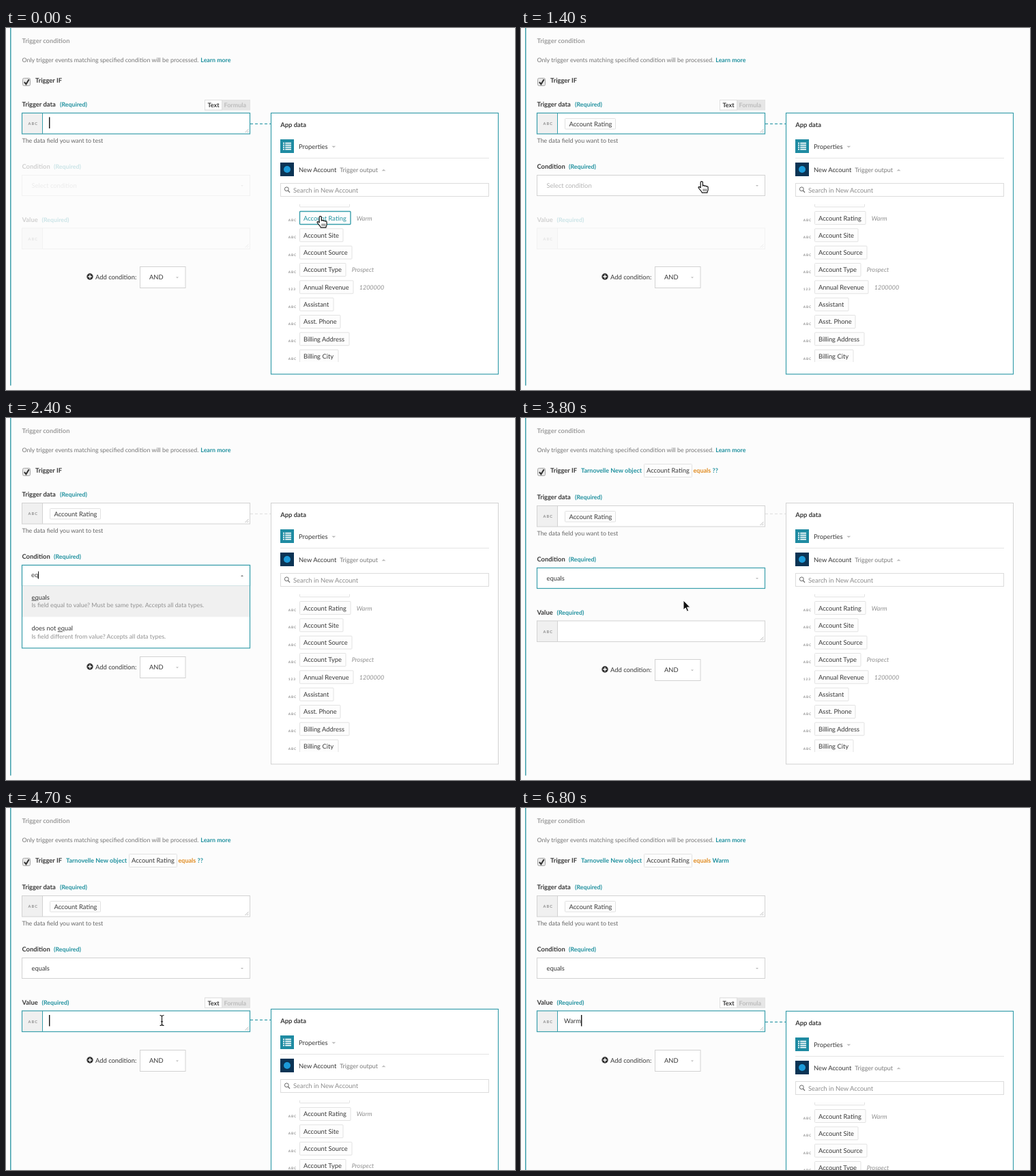
Write an HTML page that moves like this. It is 746 px wide and 530 px high and loops after 7000 ms.

```html
<!DOCTYPE html>
<html lang="en">
<head>
<meta charset="utf-8">
<title>Trigger condition</title>
<style>
html, body { margin: 0; width: 100%; height: 100%; overflow: hidden; background: #fcfcfc; }
svg { display: block; font-family: Lato, sans-serif; text-rendering: geometricPrecision; }
text { white-space: pre; }
</style>
</head>
<body>
<svg id="stage" width="746" height="530" viewBox="0 0 746 530"></svg>
<script>
const LOOP = 7000, STEP = 100;
const TEAL = '#20919f', FOCUSED = '#3a9fac', INK = '#383838', LINE = '#d2d2d2', MUTED = '#9c9c9c';
const BIG = 9.38, SMALL = 8.88;

// Moments of the story, in ms
const PICK = 500, OPEN = 1600, CHOOSE = 3000, FOCUS = 4250, SUMMARY = 5700;
const QUERY = [[2100, 'e'], [2400, 'eq'], [2500, 'equ'], [2600, 'equa'], [2800, 'equal']];
const VALUE = [[5000, 'W'], [5150, 'Wa'], [5300, 'War'], [5400, 'Warm']];

const OPTIONS = [
  ['contains', 'Does field contain value? Only works for text data.'],
  ['starts with', 'Does field start with value? Only works for text data.'],
  ['ends with', 'Does field end with value? Only works for text data.'],
  ['equals', 'Is field equal to value? Must be same type. Accepts all data types.'],
  ['does not contain', 'Is value missing in field? Only works for text data.'],
  ['does not start with', 'Does field start differently? Only works for text data.'],
  ['does not equal', 'Is field different from value? Accepts all data types.']
];
// label, right edge, sample, type
const ROWS = [
  ['Account Rating', 505, 'Warm'], ['Account Site', 494], ['Account Source', 507],
  ['Account Type', 498, 'Prospect'], ['Annual Revenue', 509, '1200000', '123'],
  ['Assistant', 480], ['Asst. Phone', 490], ['Billing Address', 503], ['Billing City', 487]
];
const PATH = [
  [400, 461, 276], [1350, 265, 225], [3400, 265, 225], [3800, 238, 267],
  [4150, 228.5, 311], [5500, 228.5, 311], [6050, 333, 93]
];

const stage = document.getElementById('stage');
const pen = document.createElement('canvas').getContext('2d');
const clamp = v => Math.max(0, Math.min(1, v));
const progress = (t, start, length) => clamp((t - start) / length);
const typed = (keys, t) => keys.reduce((text, [at, s]) => t >= at ? s : text, '');

function widthOf(s) {
  pen.font = `${BIG}px Lato, sans-serif`;
  return pen.measureText(s).width;
}

// y is the middle of the capitals
const text = (x, y, s, fill = INK, size = BIG, extra = '') =>
  `<text x="${x}" y="${y + 3.2}" font-size="${size}" fill="${fill}" ${extra}>${s}</text>`;
const bold = (x, y, s, fill = INK, size = 9.4) => text(x, y, s, fill, size, 'font-weight="700"');
const rect = (x, y, w, h, fill, stroke = 'none', sw = 1, extra = '') =>
  `<rect x="${x}" y="${y}" width="${w}" height="${h}" fill="${fill}" stroke="${stroke}" stroke-width="${sw}" ${extra}/>`;
const path = (d, stroke, sw = 1, fill = 'none', extra = '') =>
  `<path d="${d}" stroke="${stroke}" stroke-width="${sw}" fill="${fill}" ${extra}/>`;
const group = (body, attrs) => `<g ${attrs}>${body}</g>`;
const triangle = (x, y, up, r = 3, fill = '#bcbcbc') =>
  path(`M${x - r} ${y + (up ? r : -r) * .45}h${2 * r}l${-r} ${(up ? -r : r) * .9}z`, 'none', 0, fill);
const caret = (x, y, h = 16.5, w = 1.4) => path(`M${x} ${y}v${h}`, '#111', w);
const frame = (x, y, w, h, fill, on) => rect(x, y, w, h, fill, on ? FOCUSED : LINE, on ? 1.2 : 1);
const pill = (x, y, right, h = 19, stroke = '#e2e2e2', sw = 1) =>
  rect(x, y, right - x, h, '#fdfdfd', stroke, sw, 'rx="1"');
const abc = (x, y, size, s = 'ABC') =>
  text(x, y - 1.4, s, '#8e8e8e', size, `font-weight="700" letter-spacing="${size * .2}"`);

const label = (y, name, gap) => bold(23.5, y, name) + bold(gap, y, '(Required)', TEAL, 8.8);

function toggle(y) {
  return rect(291.5, y, 66, 14.5, '#e6e6e6', '#e3e3e3') +
    rect(291.5, y, 25, 14.5, '#fff', '#dfdfdf') +
    bold(295.5, y + 7.6, 'Text', INK, 9) + bold(319.5, y + 7.6, 'Formula', '#bcbcbc', 9);
}

function field(y, on) {
  return rect(23.5, y, 334, 30.5, '#fff') + rect(23.5, y, 30, 30.5, '#f0f0f0') +
    path(`M53.5 ${y}v30.5`, on ? FOCUSED : LINE) + abc(32.5, y + 16, 5.6) +
    path(`M350.5 ${y + 28.5}l5-5m-2.2 5l2.2-2.2`, '#aaa', .8) +
    frame(23.5, y, 334, 30.5, 'none', on) + (on ? toggle(y - 19) : '');
}

function header(t) {
  let s = bold(23.5, 19, 'Trigger condition', MUTED, 9.3) +
    text(23.5, 47, 'Only trigger events matching specified condition will be processed.', '#757575', SMALL) +
    bold(285.3, 47, 'Learn more', TEAL, 8.8) +
    rect(24.5, 73.5, 11, 11, '#e9e9e9', '#a5a5a5', 1, 'rx="2"') +
    path('M26.8 79.2l2.6 3 4.3-7', '#333', 2) +
    bold(43, 76.7, 'Trigger IF');
  if (t >= CHOOSE) {
    s += bold(88, 76.7, 'Tarnovelle New object', TEAL, 9) +
      pill(180.5, 67.5, 250.5) + text(184, 76.7, 'Account Rating') +
      bold(252.5, 76.7, 'equals', '#e08a1e', 9) +
      bold(280.5, 76.7, t >= SUMMARY ? 'Warm' : '??', TEAL, 9);
  }
  return s;
}

function dataField(t, shift) {
  const y = 124.5 + shift;
  return label(y - 12.6, 'Trigger data', 79) + field(y, t < OPEN) +
    (t < PICK ? caret(63.7, y + 6) : pill(64.5, y + 8, 138.5, 15.5) + text(70.5, y + 16.2, 'Account Rating')) +
    text(23.5, y + 40.3, 'The data field you want to test', '#666', SMALL);
}

function conditionField(t, shift) {
  const y = 215.5 + shift, on = t >= OPEN && t < FOCUS, chosen = t >= CHOOSE;
  const s = label(y - 12.6, 'Condition', 70) + frame(23.5, y, 334, 30, '#fff', on) +
    text(37.5, y + 15, chosen ? 'equals' : 'Select condition', chosen ? INK : '#b4b4b4') +
    triangle(346, y + 15.5, false, 2);
  return group(s, `opacity="${.22 + .78 * progress(t, PICK, 400)}"`);
}

function valueField(t, shift) {
  const y = 293 + shift, on = t >= FOCUS, s = typed(VALUE, t);
  const since = t - (s ? 5450 : FOCUS);
  const lit = on && (since < 0 || since % 1000 < 500);
  const body = label(y - 12.5, 'Value', 52.5) + field(y, on) + text(63, y + 15, s) +
    (lit ? caret(63.7 + (s ? widthOf(s) : 0), y + 6) : '');
  return group(body, `opacity="${.22 + .78 * progress(t, CHOOSE, 400)}"`);
}

function addCondition(dy) {
  const s = '<circle cx="123" cy="364" r="4.7" fill="#333"/>' +
    path('M120.3 364h5.4m-2.7-2.7v5.4', '#fff', 1.4) +
    text(131, 364.3, 'Add condition:') +
    frame(196.5, 349.5, 66.5, 31, '#fff') + text(210, 365.1, 'AND') + triangle(251, 365.5, false, 2);
  return group(s, `transform="translate(0 ${dy})"`);
}

function dropdown(t) {
  const query = typed(QUERY, t), pitch = 45.7;
  const found = OPTIONS.filter(([name]) => name.includes(query));
  const h = Math.min(199, found.length * pitch);
  let s = rect(23.5, 215.5, 334, 30 + h, '#fff'), list = '';
  found.forEach(([name, note], i) => {
    const y = 245.5 + i * pitch;
    const title = query ? name.replace(query, `<tspan text-decoration="underline">${query}</tspan>`) : name;
    if (!i) list += rect(24, y, 333, pitch, '#f0f0f0');
    list += text(37.5, y + 16.9, title) + text(37.5, y + 28.7, note, '#909090', SMALL);
  });
  s += group(list, 'clip-path="url(#menu)"') +
    `<clipPath id="menu"><rect x="23" y="245" width="335" height="${h}"/></clipPath>` +
    (query ? text(37, 230, query) : text(37.5, 230.5, 'Select condition', '#b4b4b4')) +
    caret(37.4 + widthOf(query), 224.5, 11, 1) + triangle(346, 231, true, 2, '#777') +
    path('M24 245.5h333', '#d3e3e5');
  return s + frame(23.5, 215.5, 334, 30 + h, 'none', true);
}

function panel(t, hover) {
  const on = t < OPEN || t >= FOCUS;
  const dy = 173 * (1 - (1 - progress(t, FOCUS - 50, 675)) ** 3);
  let s = path('M358 140.3h30.5', on ? FOCUSED : '#dcdcdc', on ? 1.2 : 1, 'none', 'stroke-dasharray="4 3"') +
    frame(388.5, 124.5, 333, 382.3, '#fff', on) +
    bold(402.3, 141.8, 'App data') +
    rect(402, 163, 20, 20, '#1f8ba2');
  for (let y = 168.6; y < 179; y += 3) s += path(`M406 ${y}h2m1.2 0h8.8`, '#fff', 1.6);
  s += text(429, 173.7, 'Properties') + triangle(480.3, 174) +
    path('M402 190.5h306', '#e4e4e4') +
    rect(402, 197, 20, 20, '#0b3455') + '<circle cx="412" cy="207" r="5" fill="#1c9bd9"/>' +
    text(429, 207.8, 'New Account') + text(489.3, 207.8, 'Trigger output', '#777', 8.98) + triangle(553.5, 208, true) +
    rect(402.5, 227.5, 305, 19, '#fff', '#dcdcdc') +
    '<circle cx="411.3" cy="235.8" r="2.9" fill="none" stroke="#666"/>' + path('M413.4 238l2.6 2.8', '#666', 1.2) +
    text(421, 237.3, 'Search in New Account', '#8c8c8c');
  let list = pill(430.5, 243, 503.5);
  ROWS.forEach(([name, right, sample, type], i) => {
    const y = 278.3 + i * 25.33, lit = hover && !i;
    list += abc(413.7, y + 2.8, 4.8, type) +
      pill(430.5, y - 9.8, right, 19, lit ? FOCUSED : undefined, lit ? 1.4 : 1) +
      text(436, y, name, lit ? TEAL : INK);
    if (sample) list += text(right + 8.7, y, sample, '#8f8f8f', 9, 'font-style="italic"');
  });
  s += '<clipPath id="rows"><rect x="402" y="258" width="310" height="231"/></clipPath>' +
    group(list, 'clip-path="url(#rows)"');
  return group(s, `transform="translate(0 ${dy.toFixed(2)})"`);
}

function pointerAt(t) {
  let i = PATH.findIndex(k => k[0] > t);
  if (i < 0) i = PATH.length;
  const a = PATH[Math.max(0, i - 1)], b = PATH[Math.min(i, PATH.length - 1)];
  const u = progress(t, a[0], b[0] - a[0] || 1), e = u * u * (3 - 2 * u);
  return [a[1] + (b[1] - a[1]) * e, a[2] + (b[2] - a[2]) * e];
}

function cursor(t, x, y) {
  if ((t >= 2050 && t < 3400) || (t >= 4950 && t < 5500) || t >= 6400) return '';
  const hand = t < OPEN + 450 && (x > 430 || y < 245);
  const beam = t > 3800 && y > 297;
  let s;
  if (hand) {
    s = path('M-1.8 1.2c0-2 3.2-2 3.2 0v5c.4-1.2 2.7-1 2.8.4c.5-1 2.5-.7 2.6.6c.6-.8 2.3-.4 2.3 1v3.6c0 1.7-1.2 2.5-1.2 4.4h-7.6c-.4-2.6-3.2-4.2-5-7c-.9-1.5 1-2.4 2.9-.3z',
      '#111', 1.2, '#fff', 'stroke-linejoin="round"') +
      path('M2.2 10.5v3.4m2.1-3.4v3.4m2.1-3.4v3.4', '#111', .8);
  } else if (beam) {
    const d = 'M-3-7.5q3 0 3 2q0-2 3-2M0-5.5v11M-3 7.5q3 0 3-2q0 2 3 2M-1.6 1.8h3.2';
    s = path(d, '#fff', 2.4) + path(d, '#111', 1.1);
  } else {
    s = path('M0 0v14l3.2-3 2.2 5.2 2.3-1-2.2-5h4.4z', '#fff', 1, '#111', 'stroke-linejoin="round"');
  }
  return group(s, `transform="translate(${x.toFixed(1)} ${y.toFixed(1)})"`);
}

function scene(t) {
  const shift = t >= CHOOSE ? 4 : 0, late = t >= FOCUS;
  const [x, y] = pointerAt(t);
  const hover = t < OPEN && x > 430 && y > 268;
  return rect(0, 0, 746, 530, '#fcfcfc') +
    path(`M6.8 0v${late ? 530 : 523.5}`, TEAL, 1.3) +
    header(t) + dataField(t, shift) + conditionField(t, shift) + valueField(t, shift) +
    addCondition(shift + (late ? 1 : 0)) +
    panel(t, hover) +
    (t >= OPEN && t < CHOOSE ? dropdown(t) : '') +
    cursor(t, x, y);
}

let start, shown = -1;
function tick(now) {
  start ??= now;
  const t = Math.floor((now - start) % LOOP / STEP) * STEP;
  if (t !== shown) stage.innerHTML = scene(shown = t);
  requestAnimationFrame(tick);
}
requestAnimationFrame(tick);
</script>
</body>
</html>
```
